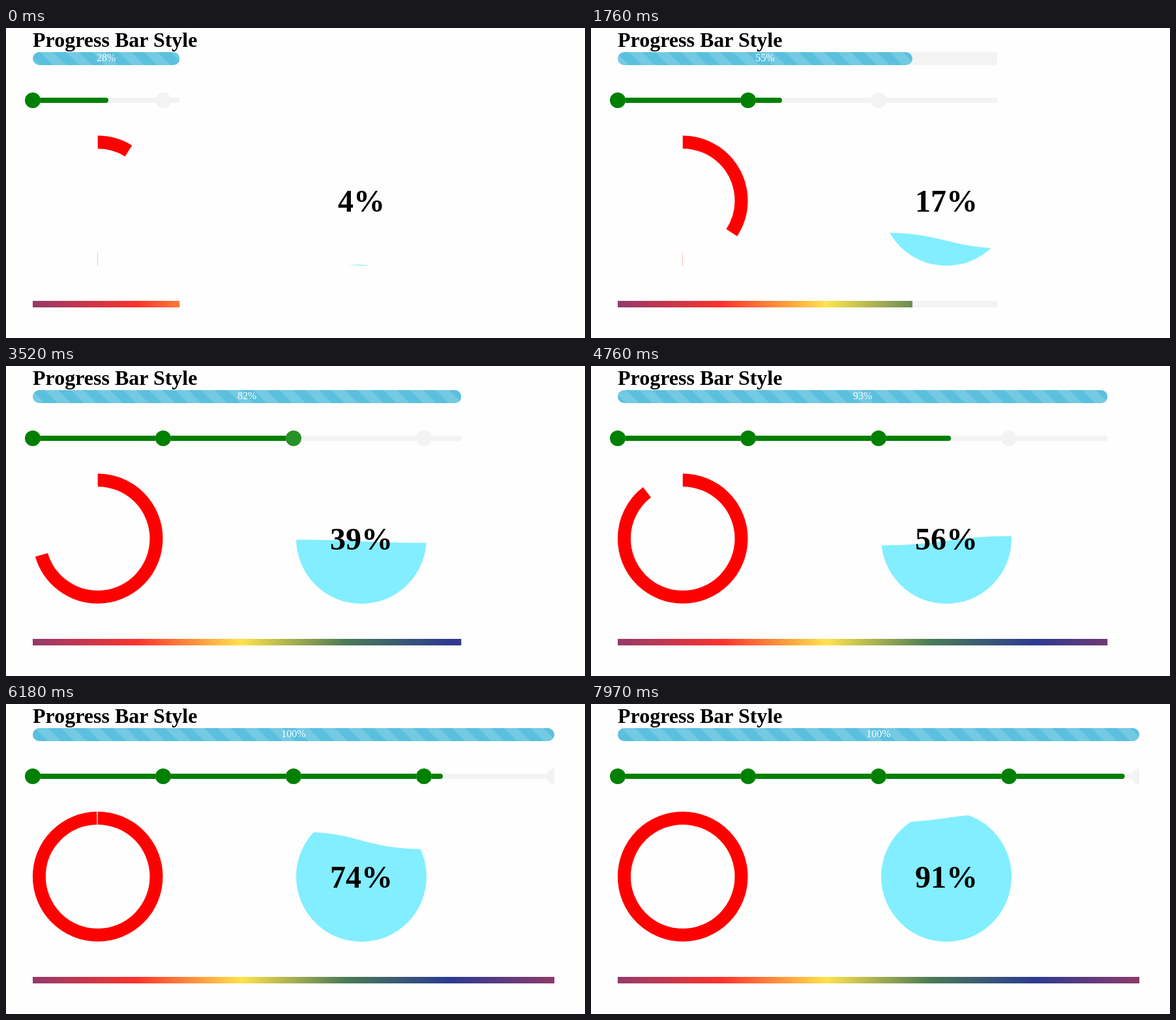
Write an HTML page with a canvas that moves like this. It is 888 px wide and 476 px high and loops after 8000 ms.

```html
<!DOCTYPE html>
<html lang="en">
<head>
<meta charset="utf-8">
<title>Progress Bar Style</title>
<style>
html, body { margin: 0; width: 100%; height: 100%; overflow: hidden; background: #fefefe; }
body { font-family: "Liberation Serif", "Times New Roman", serif; }
canvas, h1, span { position: absolute; left: 0; top: 0; margin: 0; white-space: nowrap; }
h1 { left: 41px; font-size: 32px; line-height: 36px; }
span { transform: translateX(-50%); }
#label { top: 36px; font-size: 16px; line-height: 20px; color: #fff; }
#level { left: 545px; top: 239px; font-size: 48px; line-height: 54px; font-weight: bold; }
</style>
</head>
<body>
<canvas id="stage" width="888" height="476"></canvas>
<h1>Progress Bar Style</h1>
<span id="label"></span>
<span id="level"></span>
<script>
const ctx = document.getElementById('stage').getContext('2d');
const label = document.getElementById('label');
const level = document.getElementById('level');

const LOOP = 8000, LEFT = 41, WIDTH = 800;
const TRACK = '#f3f3f3', GREEN = '#008000';
const clamp = v => Math.min(1, Math.max(0, v));
const swing = v => 0.5 - 0.5 * Math.cos(Math.PI * clamp(v));

// cubic-bezier(0, 0, .58, 1)
function easeOut(x) {
  let lo = 0, hi = 1;
  for (let i = 0; i < 30; i++) {
    const s = (lo + hi) / 2;
    if (1.74 * s * s - 0.74 * s ** 3 < x) lo = s; else hi = s;
  }
  return 3 * lo * lo - 2 * lo ** 3;
}

// All motion as functions of seconds
function barAt(t) {
  const p = easeOut(clamp(0.1814 + 0.1304 * t));
  return p > 0.999 ? 1 : p;
}
const ringAt = t => swing(0.192 + 0.1257 * t);
const stepAt = t => 116 + 83 * t;

function waterAt(t) {
  const p = swing(0.13 + 0.086 * t);
  const amp = 24.5 * Math.sqrt(4 * p * (1 - p));
  const deg = 37 + 158 * t - 4.4 * Math.max(0, t - 5) ** 2;
  const a = deg * Math.PI / 180, y = 365 - 200 * p;
  return { p, left: y + amp * Math.sin(a), right: y + amp * Math.cos(a) };
}

// The picture advances in held steps of about 137 ms
const marks = [0, 150, 970, 1120, 1240, 2170, 2290, 2440, 2580, 3270, 3390, 3520, 3670,
  4370, 4520, 4760, 4910, 5450, 5610, 6180, 6330, 6580, 6730, 7700, 7830, 7970];
const ticks = [0];
for (let i = 1; i < marks.length; i++) {
  const from = marks[i - 1], gap = marks[i] - from, n = Math.round(gap / 137);
  for (let k = 1; k <= n; k++) ticks.push(from + gap * k / n);
}

// The grey tracks show only as far right as anything has moved so far
let reach = 0;
const reveal = ticks.map((ms, i) => {
  const t = ms / 1000;
  const dy = Math.max(0, waterAt(t).right - 265);
  const water = i ? 545 + Math.sqrt(Math.max(0, 1e4 - dy * dy)) : 0;
  return reach = Math.max(reach, LEFT + WIDTH * barAt(t), water);
});

const rainbow = ctx.createLinearGradient(LEFT, 0, LEFT + WIDTH, 0);
['#943a6b', '#fb322d', '#ffe34c', '#4a7a55', '#2c3a92', '#8c3a68']
  .forEach((c, i) => rainbow.addColorStop(i / 5, c));

function box(x, y, w, h, r, color) {
  ctx.fillStyle = color;
  ctx.beginPath();
  ctx.roundRect(x, y, w, h, r);
  ctx.fill();
}

function dot(i, color) {
  ctx.fillStyle = color;
  ctx.beginPath();
  ctx.arc(LEFT + 200 * i, 111, 12, 0, 7);
  ctx.fill();
}

function drawTracks(right) {
  ctx.save();
  ctx.beginPath();
  ctx.rect(0, 0, right, 476);
  ctx.clip();
  box(LEFT, 37, WIDTH, 20, 10, TRACK);
  box(LEFT, 107, WIDTH, 8, 0, TRACK);
  box(LEFT, 419, WIDTH, 10, 0, TRACK);
  for (let i = 1; i < 5; i++) dot(i, TRACK);
  ctx.restore();
}

function drawBar(t, w) {
  ctx.save();
  box(LEFT, 37, w, 20, 10, '#5bc0de');
  ctx.clip();
  ctx.fillStyle = 'rgba(255,255,255,.15)';
  const shift = (20.7 * (t + 1.39)) % 40;
  for (let x = LEFT - 40 - shift; x < LEFT + w; x += 40) {
    ctx.beginPath();
    ctx.moveTo(x, 37);
    ctx.lineTo(x + 20, 37);
    ctx.lineTo(x + 40, 57);
    ctx.lineTo(x + 20, 57);
    ctx.fill();
  }
  ctx.restore();
}

function drawSteps(len) {
  box(LEFT, 107, len, 8, 4, GREEN);
  for (let i = 0; i < 4; i++) {
    const a = i ? clamp((len - 200 * i + 12) / 24) : 1;
    if (!a) continue;
    dot(i, TRACK);
    ctx.globalAlpha = a;
    dot(i, GREEN);
    ctx.globalAlpha = 1;
  }
}

function drawRing(p) {
  const top = -Math.PI / 2;
  ctx.strokeStyle = '#f00';
  ctx.lineWidth = 20;
  ctx.beginPath();
  ctx.arc(140.7, 265, 89.8, top, top + 2 * Math.PI * p);
  ctx.stroke();
  if (p < 0.49) box(140, 345, 1, 20, 0, 'rgba(255,0,0,.25)');
}

function drawWater({ left, right }) {
  ctx.save();
  ctx.beginPath();
  ctx.arc(545, 265, 100, 0, 7);
  ctx.clip();
  ctx.fillStyle = '#82eeff';
  ctx.beginPath();
  ctx.moveTo(445, left);
  ctx.bezierCurveTo(545, left, 545, right, 645, right);
  ctx.lineTo(645, 366);
  ctx.lineTo(445, 366);
  ctx.fill();
  ctx.restore();
}

function draw(now) {
  const ms = now % LOOP;
  const i = ticks.findLastIndex(v => v <= ms + 0.5);
  const t = ticks[i] / 1000;
  const w = WIDTH * barAt(t), water = waterAt(t);

  ctx.clearRect(0, 0, 888, 476);
  drawTracks(Math.round(reveal[i]));
  drawBar(t, w);
  drawSteps(stepAt(t));
  drawRing(ringAt(t));
  drawWater(water);
  box(LEFT, 419, w, 10, 0, rainbow);

  // The bar's counter refreshes every 80 ms
  const seen = Math.floor(ticks[i] / 80 + 1e-6) * 0.08;
  label.textContent = Math.floor(100 * barAt(seen)) + '%';
  label.style.left = LEFT + w / 2 + 'px';
  level.textContent = Math.floor(100 * water.p) + '%';
}

const start = performance.now();
function loop() {
  draw(performance.now() - start);
  requestAnimationFrame(loop);
}
loop();
</script>
</body>
</html>
```
